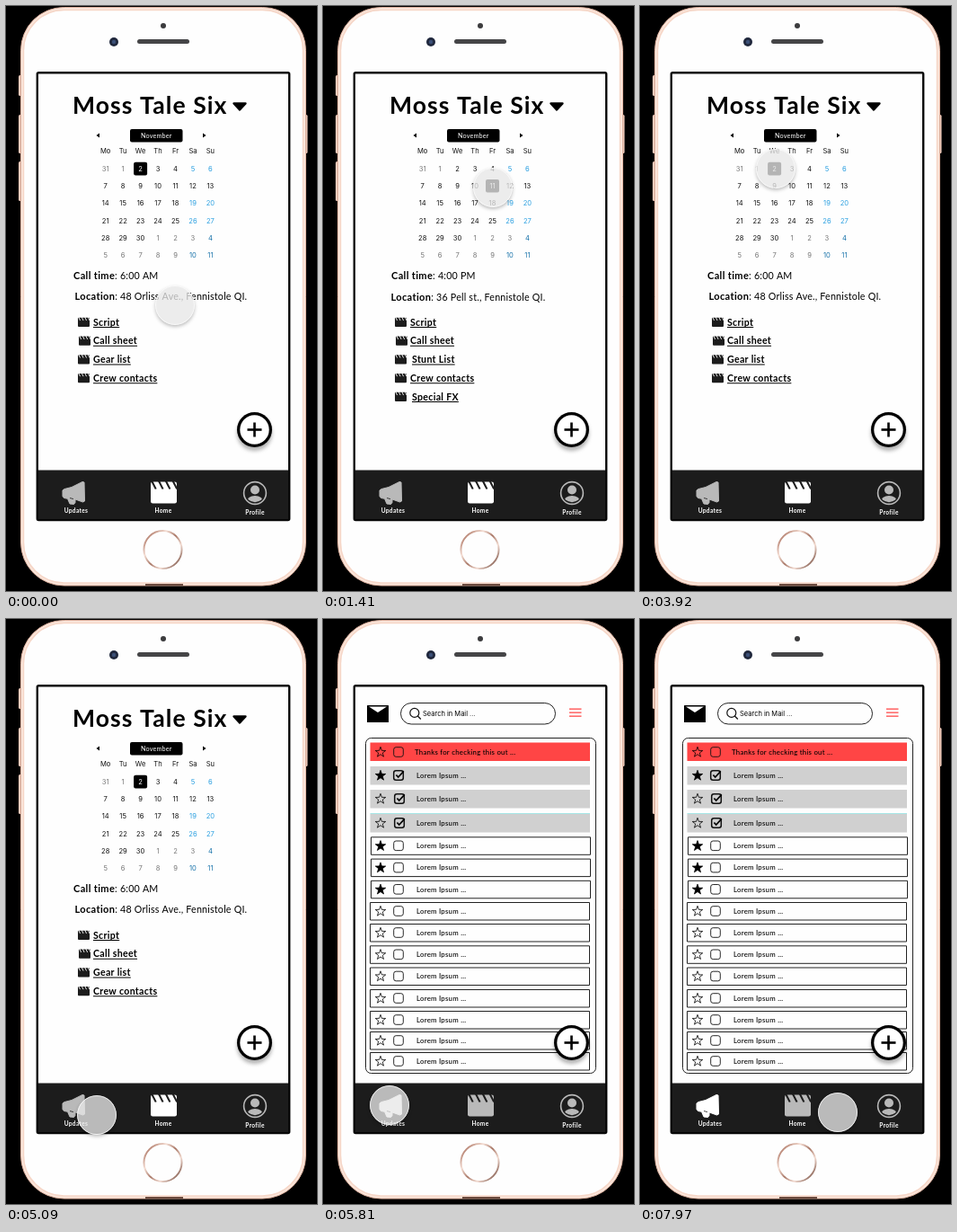
These frames come from a looping animation (346 by 651 pixels, 8000 ms). An HTML page with a canvas:

```html
<!DOCTYPE html>
<html lang="en">
<head>
<meta charset="utf-8">
<title>Film crew app</title>
<style>
html, body { margin: 0; width: 100%; height: 100%; overflow: hidden; background: #000; }
canvas { display: block; width: 346px; height: 651px; }
</style>
</head>
<body>
<canvas id="stage"></canvas>
<script>
const W = 346, H = 651, LOOP = 8000;
const scale = window.devicePixelRatio || 1;
const INK = '#1c1c1c', GREY = '#b9b9b9', PAPER = '#fefefe';
const LATO = 'Lato, "Open Sans", sans-serif', INTER = 'Inter, Roboto, sans-serif';

function setup(canvas) {
  canvas.width = W * scale;
  canvas.height = H * scale;
  const c = canvas.getContext('2d');
  c.scale(scale, scale);
  return c;
}

const screen = setup(document.getElementById('stage'));
let g = screen;

function box(x, y, w, h, r, fill, stroke, line = 1) {
  g.beginPath();
  g.roundRect(x, y, w, h, r);
  paint(fill, stroke, line);
}

function disc(x, y, r, fill, stroke, line = 1) {
  g.beginPath();
  g.arc(x, y, r, 0, Math.PI * 2);
  paint(fill, stroke, line);
}

function poly(points, fill, stroke, line = 1) {
  g.beginPath();
  points.forEach(([x, y]) => g.lineTo(x, y));
  if (fill) g.closePath();
  paint(fill, stroke, line);
}

function paint(fill, stroke, line) {
  if (fill) { g.fillStyle = fill; g.fill(); }
  if (stroke) { g.strokeStyle = stroke; g.lineWidth = line; g.stroke(); }
}

// Draws text on its baseline and returns its width.
function text(str, x, y, font, { color = '#000', align = 'left', gap = 0 } = {}) {
  g.font = font;
  g.letterSpacing = gap + 'px';
  g.fillStyle = color;
  g.textAlign = align;
  g.fillText(str, x, y);
  return g.measureText(str).width;
}

function shadow(color, blur, dy) {
  g.shadowColor = color;
  g.shadowBlur = blur * scale;
  g.shadowOffsetY = dy * scale;
}

function clapper(x, y, w, h, color, back) {
  box(x, y, w, h, w * 0.08, color);
  const top = h * 0.34;
  g.save();
  g.beginPath();
  g.rect(x, y - 1, w, top + 1);
  g.clip();
  for (let i = 0; i < 4; i++) {
    const sx = x + w * (0.08 + i * 0.27);
    poly([[sx - w * 0.04, y - 1], [sx + w * 0.12, y + top]], null, back, w * 0.07);
  }
  g.restore();
}

function megaphone(color) {
  poly([[63, 539], [65, 537.5], [73, 535.5], [85, 529.5], [87, 530], [87.5, 551], [85.5, 552],
    [77, 549], [77, 552.5], [75.5, 554.5], [71, 554], [68.5, 548.3], [64.5, 547.5], [63, 545.5]],
    color, color, 1);
  poly([[75, 548.6], [71, 547.5]], null, INK, 0.8);
}

function profile() {
  disc(277, 542, 12.4, null, GREY, 1.6);
  g.save();
  g.beginPath();
  g.arc(277, 542, 10.2, 0, Math.PI * 2);
  g.clip();
  disc(277, 538.5, 5, GREY);
  g.beginPath();
  g.ellipse(277, 552, 9.5, 7, 0, 0, Math.PI * 2);
  paint(GREY);
  g.restore();
}

function phone() {
  g.fillStyle = '#000';
  g.fillRect(0, 0, W, H);
  const rose = '#edc9ba';
  box(14, 77, 4, 23, 1.5, rose);
  box(14, 121, 4, 43, 1.5, rose);
  box(14, 173, 4, 44, 1.5, rose);
  box(332, 121, 3.5, 43, 1.5, rose);
  box(16.5, 1.5, 317, 643.5, 48, '#fbe7dc', '#d9ad9b', 1);
  box(19.5, 4.5, 311, 637.5, 45, PAPER, '#f6d6c7', 1.5);
  box(155, 643, 42, 2, 0, '#6d4c40');

  disc(175, 22, 3, '#3c3c3e');
  disc(120, 40, 5, '#20283d');
  disc(120, 40, 2.2, '#3c5078');
  box(146, 37, 58, 5, 2.5, '#454547');

  const ring = g.createLinearGradient(158, 590, 192, 620);
  ['#b88574', '#f5ded4', '#a87766', '#f3dcd2', '#8c6558']
    .forEach((c, i) => ring.addColorStop(i / 4, c));
  disc(174.5, 605, 21, PAPER, ring, 2);

  box(34.8, 74.2, 280.4, 497.8, 1.5, PAPER, '#080808', 2.4);
}

function nav(home) {
  g.fillStyle = INK;
  g.fillRect(36, 516.5, 278, 54.5);
  megaphone(home ? GREY : '#fff');
  clapper(161, 529.5, 29, 24, home ? '#fff' : GREY, INK);
  profile();
  [['Updates', 78, 564.3], ['Home', 175, 564.3], ['Profile', 277, 565.7]].forEach(([s, x, y]) =>
    text(s, x, y, '700 6.6px ' + LATO, { color: '#fff', align: 'center', gap: 0.3 }));
}

function addButton() {
  g.save();
  shadow('rgba(0,0,0,.3)', 4, 4);
  disc(276.5, 471.5, 19.5, '#000');
  g.restore();
  disc(276.5, 471.5, 16.2, '#fff');
  box(268.5, 470.2, 16, 2.6, 0, '#000');
  box(275.2, 463.5, 2.6, 16, 0, '#000');
}

function dayColor(row, col, day) {
  if (row === 0 && day > 20 || row === 0 && day === 1) return '#777';
  if (row >= 4 && day < 10 && !(row === 4 && col === 6)) return '#777';
  if (col < 5 || row === 1) return '#111';
  return row > 3 ? '#1470a8' : '#2a9fe0';
}

function calendar(selected) {
  const font = '400 7.6px ' + INTER;
  const colX = i => 110.7 + i * 19.45;
  poly([[100.5, 144], [104, 141.5], [104, 146.5]], '#000');
  poly([[222.5, 144], [219, 141.5], [219, 146.5]], '#000');
  box(138, 137, 58.5, 14.5, 2, '#000');
  text('November', 167.3, 146.6, '400 7.2px ' + LATO, { color: '#fff', align: 'center', gap: 0.2 });
  ['Mo', 'Tu', 'We', 'Th', 'Fr', 'Sa', 'Su'].forEach((d, i) =>
    text(d, colX(i), 164.3, font, { color: '#111', align: 'center' }));
  for (let i = 0; i < 42; i++) {
    const row = Math.floor(i / 7), col = i % 7;
    const day = i === 0 ? 31 : (i - 1) % 30 + 1;
    const x = colX(col), y = 181.2 + row * 19.2;
    const on = i === selected;
    if (on) box(x - 7.5, y - 7.4, 15, 14.6, 2, '#000');
    text(day, x, y + 2.7, font, { color: on ? '#fff' : dayColor(row, col, day), align: 'center' });
  }
}

function detail(label, value, x, y) {
  const w = text(label, x, y, '700 11px ' + LATO, { gap: 0.35 });
  text(': ' + value, x + w, y, '400 10.7px ' + LATO, { gap: 0.2 });
}

function dayPage({ selected, time, place, dx, dy, links }) {
  phone();
  text('Moss Tale Six', 74, 120, '700 26.5px ' + LATO, { gap: 1.1 });
  g.lineJoin = 'round';
  poly([[253.5, 108.5], [266.5, 108.5], [260, 115.5]], '#000', '#000', 2.4);
  g.lineJoin = 'miter';
  calendar(selected);
  detail('Call time', time, 75 + dx, 304);
  detail('Location', place, 76.5 - dx, 327 + dy);
  links.forEach((name, i) => {
    const y = 352 + i * 20.75;
    const x = /^S[tp]/.test(name) ? 99 : 97;
    clapper(i === 1 ? 81 : 80, y - 5.3, 13, 10.3, INK, PAPER);
    const w = text(name, x, y + 3.6, '700 10.6px ' + LATO, { gap: 0.3 });
    box(x, y + 5, w, 1, 0, '#000');
  });
  addButton();
  nav(true);
}

function star(x, y, filled) {
  const pts = Array.from({ length: 10 }, (_, i) => {
    const r = i % 2 ? 2.4 : 6, a = i * Math.PI / 5 - Math.PI / 2;
    return [x + r * Math.cos(a), y + r * Math.sin(a)];
  });
  poly(pts, filled ? '#000' : 'transparent', '#000', 0.8);
}

function checkbox(x, y, checked) {
  box(x - 5.3, y - 5.3, 10.6, 10.6, 2.5, null, '#111', checked ? 1.5 : 0.9);
  if (checked) poly([[x - 2.6, y - 0.5], [x - 0.3, y + 2], [x + 5.8, y - 4.6]], null, '#000', 1.7);
}

function mailRow(y, i) {
  const checked = i > 0 && i < 4, nudge = i > 3 && i < 7 ? 1 : 0;
  if (i === 0) box(52.5, 137.5, 244.5, 20.5, 0, '#ff4545');
  else if (checked) box(52.5, y - 10, 244.5, 20.4, 0, '#d0d0d0');
  else box(52.5 + nudge, y - 9.5, 244, 19.5, 0, null, '#222', 1);
  if (i === 3) box(52.5, 216, 244.5, 1, 0, '#a5e6e6');
  star(64, y + 0.3, i === 1 || nudge);
  checkbox(i === 2 || i === 3 ? 85 : 84, y, checked);
  const label = i ? 'Lorem Ipsum ...' : 'Thanks for checking this out ...';
  text(label, i ? 104 : 102, y + 2.7, '500 7.8px ' + LATO, { gap: 0.25 });
}

function mailPage() {
  phone();
  box(49, 96, 24, 19, 0.5, '#000');
  poly([[51, 97.5], [71, 97.5], [61, 104]], '#fff');
  box(86.5, 93.5, 172, 23.5, 11.7, null, '#222', 1);
  disc(101.8, 104.4, 5, null, '#111', 1.2);
  poly([[105.4, 108], [108.8, 111.5]], null, '#111', 1.3);
  text('Search in Mail ...', 111, 107.8, '400 7.5px ' + INTER);
  for (let i = 0; i < 3; i++) box(274, 99.5 + i * 4, 13.5, 1.3, 0, '#ff4a4a');
  box(47.5, 132.5, 256, 373, 6, null, '#222', 1);
  [148, 174, 200, 227, 252.3, 276.6, 300.8, 325, 349, 373.3, 397.5, 422, 446, 469, 492].forEach(mailRow);
  addButton();
  nav(false);
}

function render(draw) {
  const canvas = document.createElement('canvas');
  g = setup(canvas);
  draw();
  return canvas;
}

const pages = [
  () => dayPage({
    selected: 2, time: '6:00 AM', place: '48 Orliss Ave., Fennistole QI.', dx: 0, dy: 0,
    links: ['Script', 'Call sheet', 'Gear list', 'Crew contacts']
      .map(s => s)
  }),
  () => dayPage({
    selected: 11, time: '4:00 PM', place: '36 Pell st., Fennistole QI.', dx: 1, dy: 1,
    links: ['Script', 'Call sheet', 'Stunt List', 'Crew contacts', 'Special FX']
  }),
  mailPage
].map(render);
g = screen;

// Progress in n equal jumps; the first lands at start, the last at end.
function jumps(t, start, end, n) {
  if (t < start) return 0;
  if (n === 1) return 1;
  return Math.min(n, Math.floor((t - start) / (end - start) * (n - 1) + 1.001)) / n;
}

const smooth = p => p * p * (3 - 2 * p);
const easeOut = p => 1 - Math.pow(1 - p, 2.7);

// Each move: start, end, jumps, easing, then path points [progress, x, y].
const moves = [
  [180, 880, 9, smooth, [[0, 188, 333], [0.5, 193, 268], [1, 189, 202]]],
  [2940, 3290, 5, easeOut, [[0, 189, 202], [1, 151, 181]]],
  [4730, 5450, 9, p => p,
    [[0, 151, 181], [0.22, 140, 290], [5 / 9, 101, 552], [0.67, 92, 562], [1, 74, 541]]],
  [7790, 7970, 3, smooth, [[0, 74, 541], [1, 220, 549]]]
];

function along(path, p) {
  const i = Math.max(1, path.findIndex(k => k[0] >= p));
  const [a, b] = [path[i - 1], path[i]];
  const u = (p - a[0]) / (b[0] - a[0]);
  return [a[1] + (b[1] - a[1]) * u, a[2] + (b[2] - a[2]) * u];
}

function cursorAt(t) {
  const [start, end, n, ease, path] = moves.filter(m => t >= m[0]).pop() || moves[0];
  return along(path, ease(jumps(t, start, end, n)));
}

function cursor(x, y) {
  g.save();
  g.beginPath();
  g.rect(0, 0, W, H);
  g.arc(x, y, 21.5, 0, Math.PI * 2);
  g.clip('evenodd');
  shadow('rgba(0,0,0,.3)', 4, 2);
  disc(x, y, 21.5, '#ddd');
  g.restore();
  disc(x, y, 21.8, 'rgba(231,231,231,.78)');
  disc(x, y, 21.5, null, 'rgba(255,255,255,.75)', 1);
}

// Each change: page, start, end, jumps.
const changes = [[1, 1240, 1410, 3], [0, 3920, 3920, 1], [2, 5720, 5810, 2]];

function show(page, alpha) {
  g.globalAlpha = alpha;
  g.drawImage(pages[page], 0, 0, W, H);
  g.globalAlpha = 1;
}

function frame() {
  const t = performance.now() % LOOP;
  show(0, 1);
  changes.forEach(([page, start, end, n]) => {
    const p = jumps(t, start, end, n);
    if (p) show(page, p);
  });
  cursor(...cursorAt(t));
  requestAnimationFrame(frame);
}
frame();
</script>
</body>
</html>
```
